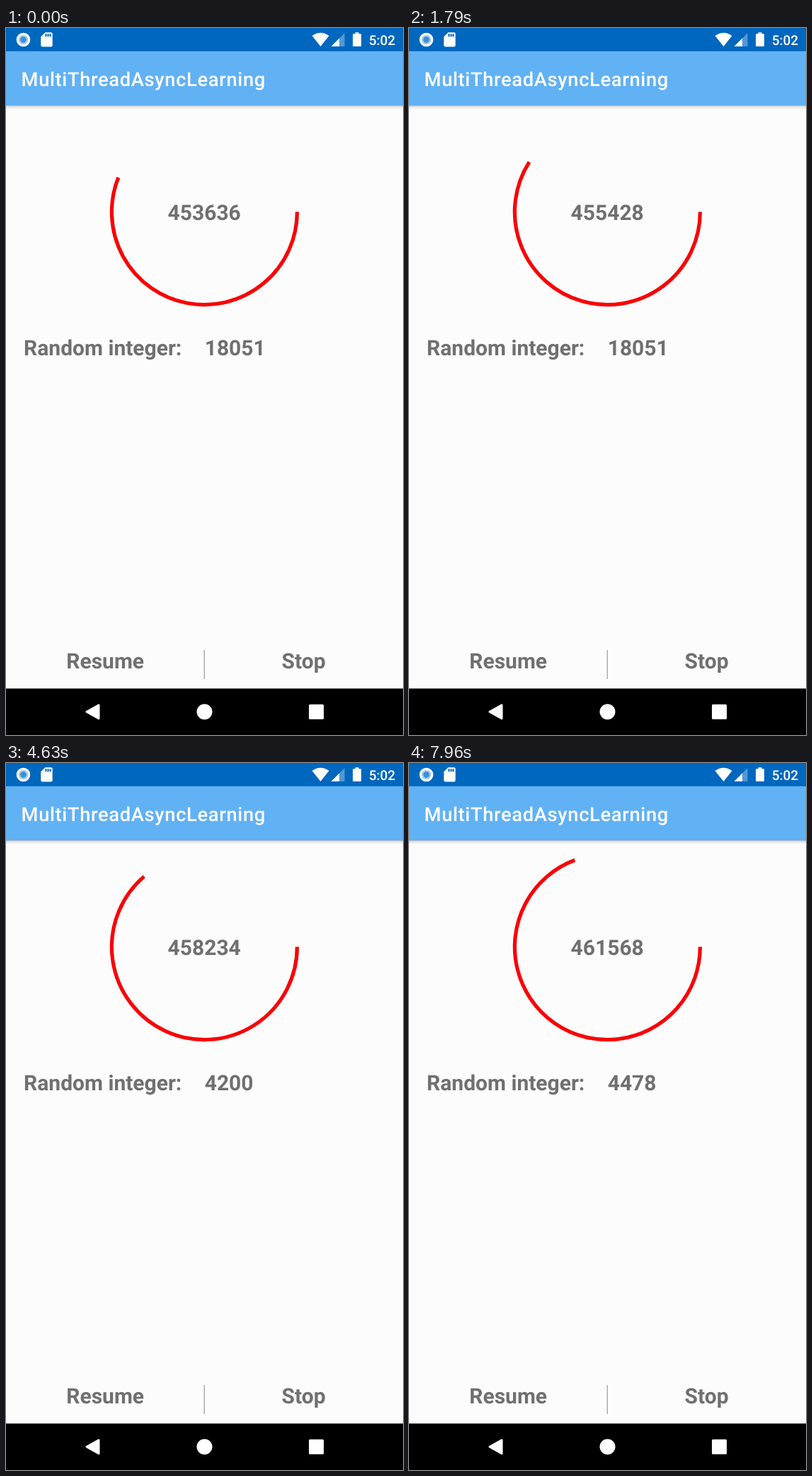
These frames come from a looping animation (561 px wide and 998 px high, 8 s). An HTML page:

```html
<!DOCTYPE html>
<html lang="en">
<head>
<meta charset="utf-8">
<title>MultiThreadAsyncLearning</title>
<style>
  html, body { margin: 0; width: 100%; height: 100%; overflow: hidden; background: #fcfcfc; }
  svg { display: block; width: 100%; height: 100%; }
  text { font-family: Roboto, sans-serif; text-rendering: geometricPrecision; }
  .label { font-size: 30px; font-weight: 700; fill: #707070; }
  .mid { text-anchor: middle; }
  .bar { font-weight: 500; fill: #fff; }
</style>
</head>
<body>
<svg viewBox="0 0 561 998" preserveAspectRatio="none">
  <defs>
    <linearGradient id="shade" x2="0" y2="1">
      <stop offset="0" stop-color="#000" stop-opacity=".27"/>
      <stop offset=".4" stop-color="#000" stop-opacity=".09"/>
      <stop offset="1" stop-color="#000" stop-opacity="0"/>
    </linearGradient>
  </defs>

  <rect width="561" height="998" fill="#fcfcfc"/>
  <rect y="109" width="561" height="6" fill="url(#shade)"/>
  <rect y="32" width="561" height="77.2" fill="#61b1f5"/>
  <rect width="561" height="32.8" fill="#0067be"/>

  <!-- status icons -->
  <circle cx="24.5" cy="16.5" r="8.2" fill="#9cc8ea" stroke="#fff" stroke-width="3.2"/>
  <circle cx="24.5" cy="16.5" r="4.2" fill="#3a8fd4"/>
  <g transform="translate(45.2 4.1) scale(1.0227)">
    <path d="M18 2H10L4 8V20Q4 22 6 22H18Q20 22 20 20V4Q20 2 18 2Z" fill="#fff"/>
    <path d="M11 4v4M14 4v4M17 4v4" stroke="#0067be" stroke-width="2"/>
  </g>
  <path d="M432.5 11Q444.5 2.5 456.5 11L444.5 26Z" fill="#fff"/>
  <path d="M478.5 7V26H459.5Z" fill="#fff" opacity=".32"/>
  <path d="M471 14.5V26H459.5Z" fill="#fff"/>
  <path d="M493.5 6.3H498.5V8.3H501Q502 8.3 502 9.3V25Q502 26 501 26H491Q490 26 490 25V9.3Q490 8.3 491 8.3H493.5Z" fill="#fff"/>
  <text class="bar" x="512.7" y="23.7" font-size="19">5:02</text>

  <text class="bar" x="21.6" y="81.7" font-size="27.3" letter-spacing=".65">MultiThreadAsyncLearning</text>

  <path id="arc" fill="none" stroke="#fa0004" stroke-width="5.2"/>
  <text id="count" class="label mid" x="280.2" y="271"></text>
  <text class="label" x="25.1" y="462">Random integer:</text>
  <text id="random" class="label" x="280.7" y="462"></text>

  <text class="label mid" x="140.2" y="903.5">Resume</text>
  <text class="label mid" x="420.6" y="903.5">Stop</text>
  <rect x="279.6" y="878" width="1.4" height="41" fill="#a9a9a6"/>

  <!-- navigation bar -->
  <rect y="932.4" width="561" height="65.6" fill="#000"/>
  <path d="M114 965.3L131 955.8V974.8Z" fill="#fff" stroke="#fff" stroke-width="3" stroke-linejoin="round"/>
  <circle cx="280.5" cy="965.3" r="11" fill="#fff"/>
  <rect x="428" y="954.8" width="21" height="21" rx="1.5" fill="#fff"/>
</svg>
<script>
  const LOOP = 8000, FPS = 24;
  const CENTER = { x: 280.4, y: 259.6 }, RADIUS = 131;

  // [time in ms, counter value]
  const COUNTS = [[0, 453636], [500, 454135], [960, 454600], [2750, 456385],
                  [4630, 458234], [5920, 459551], [7960, 461568]];
  // a new integer arrives every 3000 counts
  const INTEGERS = [18051, 4200, 4478];

  const [arc, count, random] = ['arc', 'count', 'random'].map(id => document.getElementById(id));

  function countAt(time) {
    let i = 1;
    while (i < COUNTS.length - 1 && time > COUNTS[i][0]) i++;
    const [t0, c0] = COUNTS[i - 1], [t1, c1] = COUNTS[i];
    return Math.round(c0 + (c1 - c0) * (time - t0) / (t1 - t0));
  }

  function steppedTime(time) {
    const step = Math.floor((time + 1) * FPS / 1000);
    return Math.round(step * 100 / FPS + 0.01) * 10;
  }

  function arcPath(degrees) {
    const a = degrees * Math.PI / 180;
    const x = CENTER.x + RADIUS * Math.cos(a), y = CENTER.y + RADIUS * Math.sin(a);
    const large = degrees > 180 ? 1 : 0;
    return `M${CENTER.x + RADIUS} ${CENTER.y}A${RADIUS} ${RADIUS} 0 ${large} 1 ${x} ${y}`;
  }

  function draw(time) {
    const value = countAt(steppedTime(time));
    count.textContent = value;
    random.textContent = INTEGERS[Math.floor((value - 453000) / 3000)];
    arc.setAttribute('d', arcPath(value % 60000 * 360 / 60000));
  }

  const start = performance.now();
  function tick() {
    draw((performance.now() - start) % LOOP);
    requestAnimationFrame(tick);
  }
  tick();
</script>
</body>
</html>
```
